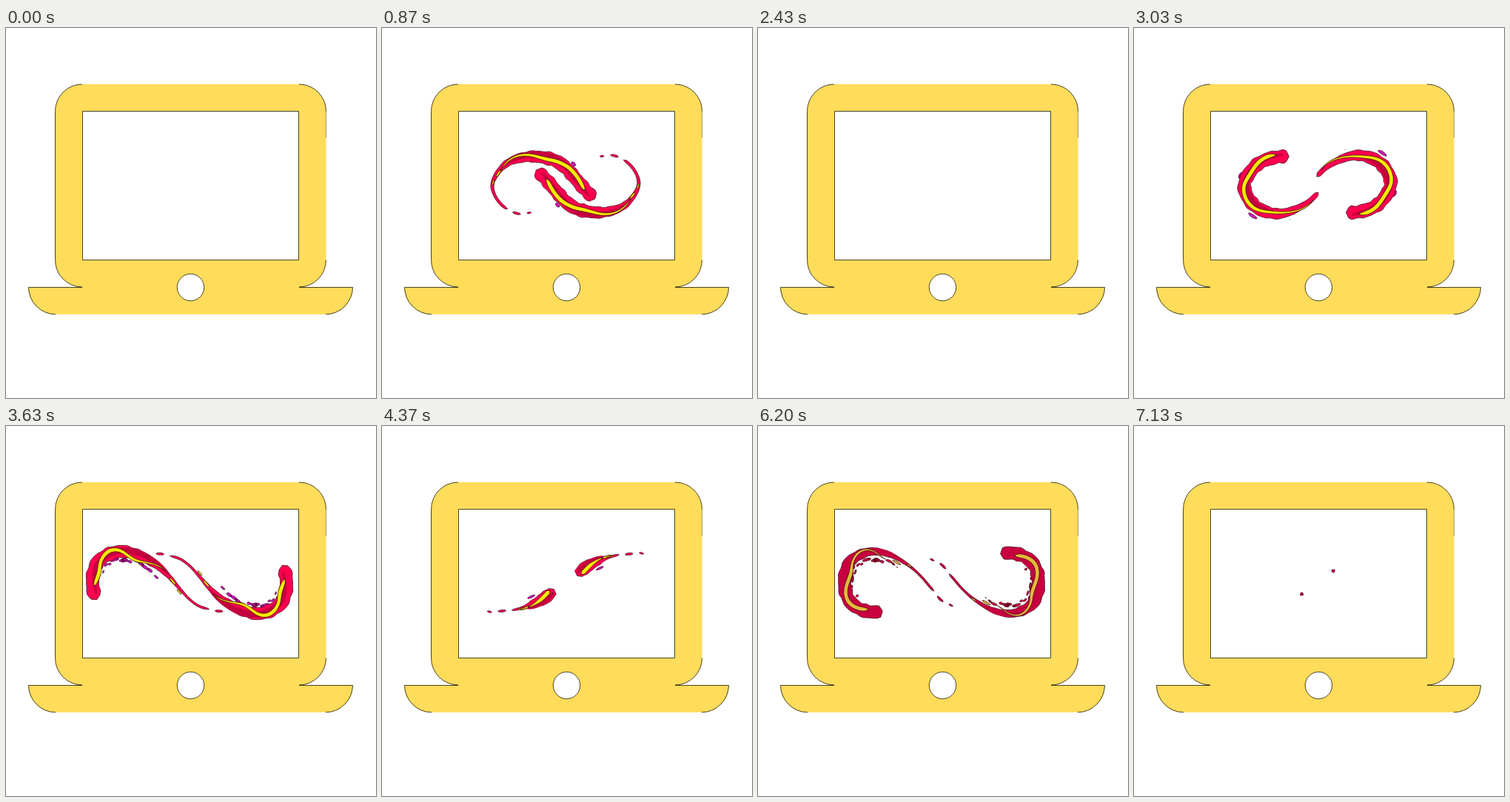
An HTML page that plays this animation: 500x500 px, repeating every 7210 ms.

```html
<!DOCTYPE html>
<html lang="en">
<head>
<meta charset="utf-8">
<title>Laptop with looping streaks</title>
<style>
html, body { margin: 0; width: 100%; height: 100%; overflow: hidden; background: #fff; }
svg { display: block; width: 100vw; height: 100vh; }
</style>
</head>
<body>
<svg viewBox="0 0 500 500">
  <path fill="#ffdc5a" d="M103 76H396A36.5 36.5 0 0 1 432.5 112.5V313.5A36.5 36.5 0 0 1 396 350H469A37 37 0 0 1 432 387H67A37 37 0 0 1 30 350H103A36.5 36.5 0 0 1 66.5 313.5V112.5A36.5 36.5 0 0 1 103 76Z"/>
  <g fill="none" stroke="#1c1804" stroke-width=".8">
    <path d="M103 350A36.5 36.5 0 0 1 66.5 313.5V112.5A36.5 36.5 0 0 1 103 76M396 76A36.5 36.5 0 0 1 432.5 112.5M432.5 313.5A36.5 36.5 0 0 1 396 350M67 387A37 37 0 0 1 30.5 350.5H103M396 350.5H468.5A37 37 0 0 1 432 387"/>
    <path d="M432.5 113V148" stroke-dasharray="1 1"/>
    <path fill="#fff" d="M103.5 112.5H395.5V313.5H103.5Z"/>
    <circle fill="#fff" cx="249.5" cy="350.5" r="18.2"/>
  </g>
  <g id="streak" stroke="#33000f" stroke-width=".7" stroke-linejoin="round">
    <path id="purple"/>
    <path id="body"/>
    <path id="shade" stroke="none"/>
    <path id="glow"/>
  </g>
  <use href="#streak" transform="rotate(180 248 211.5)"/>
</svg>
<script>
const LOOP = 7210, CYCLE = LOOP / 3, SAMPLES = 600;
const el = id => document.getElementById(id);
const clamp = (v, a = 0, b = 1) => Math.min(b, Math.max(a, v));
const smooth = v => { v = clamp(v); return v * v * (3 - 2 * v); };

// Figure eight: upward through the crossing, right loop, then left loop.
const knots = [
  [234, 218], [246, 202], [266, 184], [300, 172], [332, 182], [347, 210],
  [330, 238], [300, 249], [268, 246], [250, 236], [234, 219], [220, 203],
  [203, 188], [178, 174], [150, 170], [124, 184], [117, 212], [125, 238],
  [150, 251], [185, 247], [212, 237], [228, 226]
];

function closedCurve(points) {
  const at = i => points[(i + points.length) % points.length];
  let d = `M${points[0]}`;
  points.forEach((p, i) => {
    const before = at(i - 1), next = at(i + 1), after = at(i + 2);
    d += `C${[0, 1].map(k => p[k] + (next[k] - before[k]) / 6)} ` +
         `${[0, 1].map(k => next[k] - (after[k] - p[k]) / 6)} ${next}`;
  });
  return d;
}

const track = document.createElementNS("http://www.w3.org/2000/svg", "path");
track.setAttribute("d", closedCurve(knots));
const trackLength = track.getTotalLength();
const samples = Array.from({ length: SAMPLES }, (_, i) =>
  track.getPointAtLength(trackLength * i / SAMPLES));

function sample(s) {
  const f = (s - Math.floor(s)) * SAMPLES, i = Math.floor(f) % SAMPLES, m = f % 1;
  const a = samples[i], b = samples[(i + 1) % SAMPLES];
  return [a.x + (b.x - a.x) * m, a.y + (b.y - a.y) * m];
}

// Point on the track, moved to the left of the direction of travel.
function place(s, offset) {
  const [x, y] = sample(s), a = sample(s - .006), b = sample(s + .006);
  const dx = b[0] - a[0], dy = b[1] - a[1], n = Math.hypot(dx, dy) || 1;
  return [(x + dy / n * offset).toFixed(2), (y - dx / n * offset).toFixed(2)];
}

function ribbon(from, to, center, half) {
  const count = Math.max(8, Math.ceil((to - from) * 170));
  const left = [], right = [];
  for (let i = 0; i <= count; i++) {
    const q = i / count, s = from + (to - from) * q;
    const c = center(s, q), h = half(s, q);
    left.push(place(s, c + h));
    right.unshift(place(s, c - h));
  }
  return `M${left.concat(right).join("L")}Z`;
}

const blob = (s, offset, length, radius) =>
  ribbon(s - length / 2, s + length / 2, () => offset,
    (_, q) => radius * Math.sqrt(Math.max(0, 4 * q * (1 - q))));

function keyed(keys, t) {
  let i = 0;
  while (i < keys.length - 2 && t > keys[i + 1][0]) i++;
  const [t0, a] = keys[i], [t1, b] = keys[i + 1];
  return a + (b - a) * clamp((t - t0) / (t1 - t0));
}

const headKeys = [[70, .02], [200, .085], [524, .305], [627, .38], [1227, .79],
  [1394, .875], [1670, .995], [2100, .995], [2323, .984]];
const tailKeys = [[540, .024], [627, .035], [1227, .4], [1394, .475],
  [1670, .72], [1900, .87], [2323, .976]];

let seed = 7;
const random = () => (seed = seed * 16807 % 2147483647) / 2147483647;
const splashes = Array.from({ length: 34 }, (_, i) => ({
  s: i < 16 ? .54 + .21 * (i + random()) / 16 : random(),
  offset: 8 + random() * 5,
  length: .008 + random() * .016,
  radius: 1 + random() * 1.3
}));

const wave = s => {
  const swing = Math.exp(-(((s - .66) / .09) ** 2));
  return 1 + 2 * swing + (2.5 + 4.5 * swing) * Math.cos((s - .73) / .13 * 2 * Math.PI);
};
const ripple = s => .6 * Math.sin(s * 190) + .4 * Math.sin(s * 310 + 1);

function paint(id, d, fill) {
  el(id).setAttribute("d", d);
  el(id).setAttribute("fill", fill);
}

function draw(time) {
  const t = time % LOOP, c = t % CYCLE;
  el("streak").setAttribute("visibility", c < 100 ? "hidden" : "visible");
  const dull = t > 2 * CYCLE + 1330;
  const head = keyed(headKeys, c), tail = keyed(tailKeys, c);
  const span = head - tail, length = span * trackLength;
  const at = q => tail + span * q;
  const late = smooth((c - 500) / 500);
  const fat = Math.min(8.7, 2 + length * .09);
  const thin = Math.min(fat, 3.6 - 2.2 * late);

  const bodyHalf = (s, q) => {
    const fromHead = (head - s) * trackLength, fromTail = (s - tail) * trackLength;
    const cap = Math.sqrt(clamp(1 - (1 - clamp(fromHead / fat)) ** 2));
    const end = Math.sqrt(clamp(fromTail / Math.min(5, length / 2 || 1)));
    const swell = smooth((q - .12 * late) / (.45 + .15 * late));
    const rough = length > 40 ? ripple(s) * swell : 0;
    return (thin + (fat - thin) * swell + rough) * cap * end;
  };
  let body = ribbon(tail, head, () => 0, bodyHalf);
  if (c > 700 && length > 60) {
    body += blob(tail - .022, 1, .018, 1.5) + blob(tail - .05, -1, .01, 1.1);
  }
  paint("body", body, dull || length < 25 ? "#c9003f" : "#ff0050");

  const shade = length < 25 ? "" : ribbon(at(.3), at(.97),
    s => 2.8 * Math.sin(s * 17 + 1.2),
    (s, q) => fat * .52 * Math.sqrt(Math.max(0, 4 * q * (1 - q))));
  paint("shade", shade, "#c4003e");

  let glow = "";
  if (length > 45) {
    const start = .34 * late;
    glow = ribbon(at(start), at(.92), wave,
      (_, q) => (.8 + 2 * smooth(q * 1.6)) * Math.sqrt(clamp((1 - q) * 18)) * clamp(q * 12));
    if (late > .5) {
      glow += blob(at(.27), wave(at(.27)), .022, 1.3) + blob(at(.2), wave(at(.2)), .014, 1);
    }
  }
  paint("glow", glow, dull ? "#e6b93c" : "#f5ea00");

  const purple = length < 45 ? "" : splashes.map(p => {
    const q = (p.s - tail) / span;
    const size = smooth((q - .22) / .12) * smooth((.88 - q) / .1);
    return size > .05 ? blob(p.s, p.offset, p.length * size, p.radius * size) : "";
  }).join("");
  paint("purple", purple, dull ? "#c9003f" : "#d414c4");
}

const begin = performance.now();
function tick(now) {
  draw(Math.max(0, now - begin));
  requestAnimationFrame(tick);
}
draw(0);
requestAnimationFrame(tick);
</script>
</body>
</html>
```
